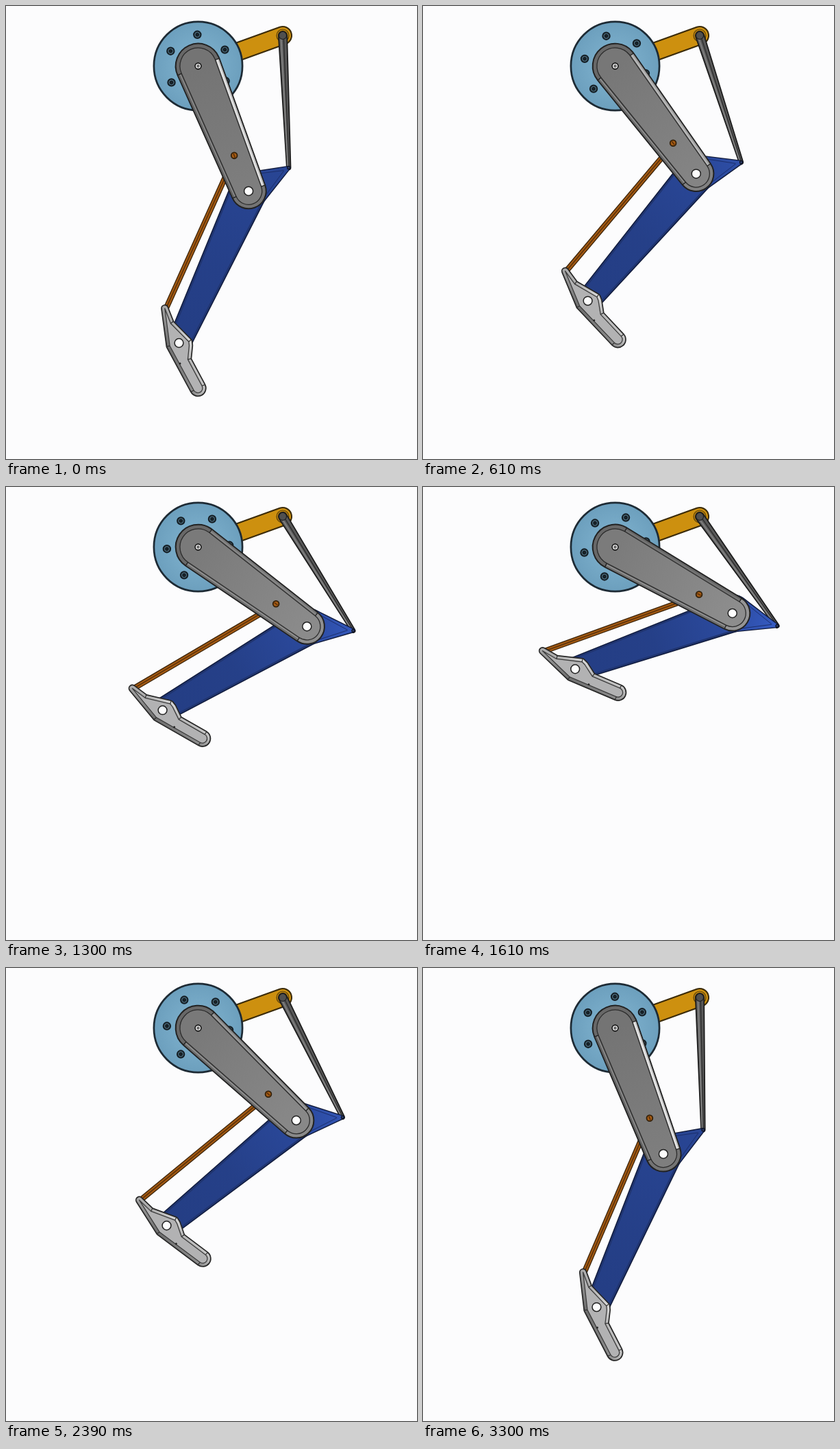
Recreate the animation shown at these times as an HTML page with a canvas. Size 600 by 660 pixels, loop 3390 ms.

```html
<!DOCTYPE html>
<html lang="en">
<head>
<meta charset="utf-8">
<title>Leg linkage</title>
<style>
html, body { margin: 0; width: 600px; height: 660px; overflow: hidden; background: #fcfcfd; }
canvas { display: block; }
</style>
</head>
<body>
<canvas id="stage" width="600" height="660"></canvas>
<script>
const ctx = document.getElementById('stage').getContext('2d');
const LOOP = 3390, RAD = Math.PI / 180;
const HIP = { x: 280.5, y: 87.5 }, PIVOT = { x: 404, y: 43 };
const THIGH = 196.5, PIN = 140.6, SHANK = 243.5, LEVER = 67.8, LEVER_ANGLE = 144.8;

// Start of each drawn step, in ms
const STEPS = [0, 90, 190, 300, 390, 520, 610, 700, 800, 910, 1000, 1110, 1210, 1300, 1400, 1510, 1610,
  1700, 1790, 1910, 2000, 2090, 2210, 2300, 2390, 2520, 2610, 2700, 2790, 2910, 3000, 3090, 3200, 3300];
// [step, thigh angle]
const SWING = [[0, 68], [4, 58.4], [6, 53], [9, 45.2], [12, 38.3], [16, 29.4], [17, 28.9], [18, 30.3],
  [21, 37.86], [24, 43.2], [28, 55.8], [30, 60.9], [33, 69]];
// [thigh angle, shank angle]
const BEND = [[28, 162.3], [29.4, 160.5], [33.5, 153.6], [37.86, 147.4], [45.2, 138.6], [55.8, 127.6], [69, 113.6]];

function lookup(table, x) {
  let i = 1;
  while (i < table.length - 1 && table[i][0] < x) i++;
  const [x0, y0] = table[i - 1], [x1, y1] = table[i];
  return y0 + (y1 - y0) * (x - x0) / (x1 - x0);
}

const polar = (c, r, a) => ({ x: c.x + r * Math.cos(a), y: c.y + r * Math.sin(a) });
const gray = v => `rgb(${v | 0},${v | 0},${v | 0})`;
const blue = light => `hsl(224, 57%, ${light}%)`;

function blend(a, b, ...colors) {
  const g = ctx.createLinearGradient(a.x, a.y, b.x, b.y);
  colors.forEach((c, i) => g.addColorStop(i / (colors.length - 1), c));
  return g;
}

function paint(fill, stroke, width) {
  if (fill) { ctx.fillStyle = fill; ctx.fill(); }
  if (stroke) { ctx.strokeStyle = stroke; ctx.lineWidth = width; ctx.stroke(); }
}

function circle(c, r, fill, stroke, width) {
  ctx.beginPath();
  ctx.arc(c.x, c.y, r, 0, 7);
  paint(fill, stroke, width);
}

function line(a, b, color, width) {
  ctx.beginPath();
  ctx.moveTo(a.x, a.y);
  ctx.lineTo(b.x, b.y);
  paint(null, color, width);
}

// Direction and tangent angle of two circles joined by straight sides
function span(a, ra, b, rb) {
  const dx = b.x - a.x, dy = b.y - a.y;
  return { dir: Math.atan2(dy, dx), open: Math.acos((ra - rb) / Math.hypot(dx, dy)) };
}

function hull(a, ra, b, rb, fill, stroke, width) {
  const { dir, open } = span(a, ra, b, rb);
  ctx.beginPath();
  ctx.arc(a.x, a.y, ra, dir + open, dir - open + 2 * Math.PI);
  ctx.arc(b.x, b.y, rb, dir - open, dir + open);
  ctx.closePath();
  paint(fill, stroke, width);
}

function drawCrank() {
  hull(HIP, 13, PIVOT, 13, '#cd900f', '#3a2a08', 2);
  circle(PIVOT, 9, '#c0850d', '#59400c', 1.2);
}

function drawDisc(theta) {
  const shade = ctx.createRadialGradient(HIP.x, HIP.y, 30, HIP.x, HIP.y, 65);
  shade.addColorStop(0, '#78abc8');
  shade.addColorStop(1, '#6c9fbd');
  circle(HIP, 64.6, shade, '#1d2a34', 2.7);
  for (let i = 0; i < 6; i++) {
    const c = polar(HIP, 45.7, theta + (20.5 + 60 * i) * RAD);
    circle(c, 5.2, '#456272', '#141d23', 2);
    circle(c, 2.2, '#1a262e', '#0c1114', 1);
  }
}

function drawPushRod(end) {
  hull(PIVOT, 6.2, end, 2.8, '#585858', '#1a1a1a', 1.7);
  const { dir } = span(PIVOT, 6, end, 2);
  const side = (s, r1, r2) => [polar(PIVOT, r1, dir + s), polar(end, r2, dir + s)];
  line(...side(Math.PI / 2, 2.6, 1.2), '#7c7c7c', 2.2);
  line(...side(-Math.PI / 2, 1.2, .4), '#2a2a2a', 1.2);
  circle(PIVOT, 5.5, '#505050', '#202020', 1.2);
}

function drawPullRod(pin, heel) {
  const { dir } = span(pin, 1, heel, 1);
  const a = polar(pin, 1, dir - Math.PI / 2), b = polar(heel, 2.5, dir - Math.PI / 2);
  line(a, b, '#3a2208', 8.4);
  line(a, b, '#a45a12', 5.8);
  line(a, b, '#5a320c', 1.6);
}

function drawShank(knee, ankle, tip, lift) {
  const edge = '#101a3a', seam = '#1a2c66';
  const near = blue(36 + 4 * lift);
  const body = blend(knee, ankle, near, blue(34), blue(33));
  hull(knee, 26.3, ankle, 16.5, null, edge, 2.8);
  hull(knee, 26.3, tip, 1.6, null, edge, 2.8);
  hull(knee, 26.3, ankle, 16.5, blue(28));
  const lit = blend(tip, knee, blue(37 + 12 * lift), near);
  hull(knee, 26.3, tip, 1.6, lit);
  const { dir } = span(tip, 1, knee, 1);
  hull(knee, 23.6, polar(tip, 9, dir), .5, null, seam, .9);
  hull(knee, 23.6, ankle, 13.8, body);
  circle(tip, 2, '#2b3d70', '#10131c', 1.2);
}

function footPath() {
  ctx.beginPath();
  ctx.moveTo(-54.5, .3);
  ctx.lineTo(-31, .5);
  ctx.lineTo(3.5, -14);
  ctx.lineTo(9, -12.5);
  ctx.lineTo(27, -3);
  ctx.arc(71.3, -1, 6.8, -1.65, 1.45);
  ctx.lineTo(-1, 14);
  ctx.closePath();
}

function drawFoot(ankle, theta) {
  ctx.save();
  ctx.translate(ankle.x, ankle.y);
  ctx.rotate(theta);
  footPath();
  paint(null, '#262626', 11.4);
  paint(null, blend({ x: 0, y: -18 }, { x: 0, y: 18 }, '#dcdcdc', '#a8a8a8', '#686868'), 8);
  paint('#b2b2b3', '#3c3c3c', 1.3);
  const tick = (x, y, u, v) => line({ x, y }, { x: u, y: v }, '#303030', 1.2);
  tick(-31, .5, -32.5, -4.5);
  tick(3.5, -14, 2, -19);
  tick(27, -3, 28, -8);
  tick(70.5, -8, 70.5, -13);
  tick(72.3, 6, 72.3, 11);
  tick(-1, 14, -2.5, 19);
  ctx.fillStyle = '#222';
  ctx.fillRect(27, 8.5, 2.5, 2.5);
  ctx.restore();
  circle(ankle, 6.4, '#fdfdfd', '#222', 1.5);
}

function drawThigh(knee, pin, theta, lift) {
  hull(HIP, 32.8, knee, 25.6, blend(HIP, knee, gray(104), gray(116 + 34 * lift)), '#222', 2);
  const { dir, open } = span(HIP, 32.8, knee, 25.6);
  const rim = (angle, inset, color, width) =>
    line(polar(HIP, 32.8 - inset, angle), polar(knee, 25.6 - inset, angle), color, width);
  rim(dir - open, 3.2, gray(195 - 95 * lift), 4.6);
  rim(dir - open, 3.8, gray(232 - 115 * lift), 2);
  rim(dir + open, 3.2, gray(98 + 14 * lift), 4.6);
  rim(dir + open, 4, gray(140 + 10 * lift), 1.6);
  const face = blend(HIP, knee, gray(116 + 8 * lift), gray(126 + 16 * lift));
  hull(HIP, 26.6, knee, 19.6, face, '#2c2c2c', 1.3);
  for (const a of [dir - open, dir + open]) {
    line(polar(HIP, 26.6, a), polar(HIP, 32.8, a), '#222', 1.3);
    line(polar(knee, 19.6, a), polar(knee, 25.6, a), '#222', 1.3);
  }
  circle(HIP, 4.4, '#f4f4f4', '#161616', 1.6);
  circle(HIP, 1.7, '#999', '#222', 1);
  circle(pin, 4.4, '#a45a12', '#33200a', 1.8);
  line(polar(pin, 3, theta), polar(pin, -3, theta), '#4e2a0a', 1.4);
  circle(knee, 6.5, '#fdfdfd', '#222', 1.5);
}

function draw(time) {
  const step = STEPS.findLastIndex(s => s <= time);
  const deg = lookup(SWING, step), bend = lookup(BEND, deg);
  const theta = deg * RAD;
  const lift = (69 - deg) / 40;
  const knee = polar(HIP, THIGH, theta);
  const pin = polar(HIP, PIN, theta);
  const ankle = polar(knee, SHANK, bend * RAD);
  const heel = polar(ankle, PIN - THIGH, theta);
  const tip = polar(knee, LEVER, (bend - LEVER_ANGLE) * RAD);

  ctx.fillStyle = '#fcfcfd';
  ctx.fillRect(0, 0, 600, 660);
  drawCrank();
  drawDisc(theta);
  drawPullRod(pin, heel);
  drawPushRod(tip);
  drawShank(knee, ankle, tip, lift);
  drawFoot(ankle, theta);
  drawThigh(knee, pin, theta, lift);
}

ctx.lineJoin = 'round';
const start = performance.now();
function tick() {
  draw((performance.now() - start) % LOOP);
  requestAnimationFrame(tick);
}
tick();
</script>
</body>
</html>
```
